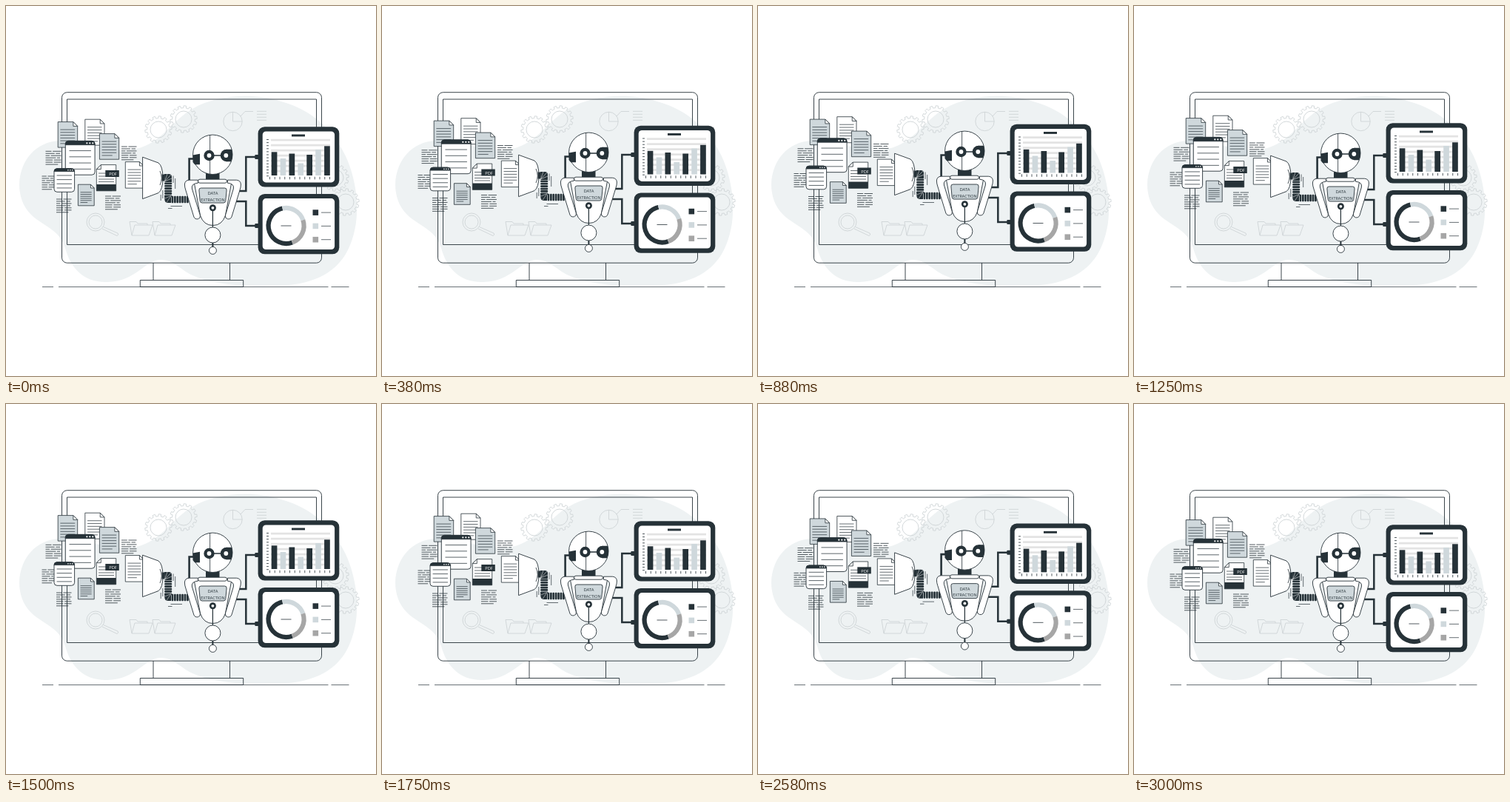
Write an HTML page with a canvas that moves like this. It is 500 by 500 pixels and loops after 3040 ms.

```html
<!DOCTYPE html>
<html lang="en">
<head>
<meta charset="utf-8">
<title>Data extraction</title>
<style>
html, body { margin: 0; width: 100%; height: 100%; overflow: hidden; background: #fff; }
canvas { display: block; width: 500px; height: 500px; }
</style>
</head>
<body>
<canvas id="stage"></canvas>
<script>
const LOOP = 3040, CYCLE = 3000, FPS = 24, LIFT = 6;
const INK = '#263238', PALE = '#cfd8dc', MID = '#a6a6a6', FAINT = '#cfd4d6', BLOB = '#eef2f3';
const canvas = document.getElementById('stage');
const c = canvas.getContext('2d');
const ratio = window.devicePixelRatio || 1;
canvas.width = canvas.height = 500 * ratio;

function paint(fill, stroke, width = 0.9) {
  if (fill) { c.fillStyle = fill; c.fill(); }
  if (stroke) { c.strokeStyle = stroke; c.lineWidth = width; c.stroke(); }
}
function box(x, y, w, h, r, fill, stroke, width) {
  c.beginPath();
  c.roundRect(x, y, w, h, r);
  paint(fill, stroke, width);
}
function disc(x, y, r, fill, stroke, width) {
  c.beginPath();
  c.arc(x, y, r, 0, Math.PI * 2);
  paint(fill, stroke, width);
}
function line(points, stroke = INK, width = 0.9) {
  c.beginPath();
  for (let i = 0; i < points.length; i += 2) c.lineTo(points[i], points[i + 1]);
  paint(null, stroke, width);
}
function shape(d, fill, stroke, width) {
  const p = new Path2D(d);
  if (fill) { c.fillStyle = fill; c.fill(p); }
  if (stroke) { c.strokeStyle = stroke; c.lineWidth = width || 0.9; c.stroke(p); }
}
function shifted(dy, draw) {
  c.save();
  c.translate(0, dy);
  draw();
  c.restore();
}

// Condensed lettering: use whichever installed family sets it narrowest.
const face = (family, size) => `extra-condensed ${size}px "${family}", sans-serif`;
function wide(family, text) {
  c.font = face(family, 100);
  return c.measureText(text).width / 100;
}
const narrow = ['Roboto', 'Noto Sans', 'Open Sans', 'Lato', 'Liberation Sans']
  .sort((a, b) => wide(a, 'EXTRACTION') - wide(b, 'EXTRACTION'))[0];
function word(text, x, y, room, most, fill) {
  c.font = face(narrow, Math.min(most, room / wide(narrow, text)));
  c.textAlign = 'center';
  c.fillStyle = fill;
  c.fillText(text, x, y);
}

function gear(x, y) {
  const teeth = 14, step = Math.PI * 2 / teeth;
  c.beginPath();
  for (let i = 0; i < teeth; i++) {
    const a = i * step;
    c.arc(x, y, 15.3, a, a + step * 0.45);
    c.arc(x, y, 18.2, a + step * 0.52, a + step * 0.93);
  }
  c.closePath();
  paint(null, FAINT, 0.9);
  disc(x, y, 11, null, FAINT, 0.9);
}
function folder(x) {
  shape(`M${x + 3} 310 L${x} 291.5 H${x + 9} L${x + 11} 294 H${x + 24} V296`, null, FAINT);
  shape(`M${x + 3} 310 L${x + 7} 296 H${x + 31} L${x + 26} 310 Z`, null, FAINT);
}

function backdrop() {
  shape('M18 241 C19 209 40 183 73 182 C111 181 135 198 169 194 C208 190 223 155 252 139 ' +
    'C284 120 334 117 372 129 C416 141 443 170 459 203 C476 240 480 288 465 323 ' +
    'C450 361 414 376 374 377.5 C326 380 281 377 252 364 C235 356 228 344 210 343 ' +
    'C188 342 177 372 137 373 C104 374 87 353 80 327 C73 302 49 297 34 282 C23 271 18 257 18 241 Z', BLOB);
  gear(206, 167);
  gear(240, 153);
  gear(445, 232);
  gear(459, 265);
  disc(306.5, 156, 12.7, null, FAINT);
  line([306.5, 143.3, 306.5, 156, 319.2, 156], FAINT);
  line([317, 149, 323, 142.5, 334, 142.5], FAINT);
  for (let i = 0; i < 4; i++) line([339, 142.3 + i * 4, 352, 142.3 + i * 4], FAINT);
  disc(121, 292, 12, null, FAINT);
  disc(121, 292, 9, null, FAINT);
  shape('M131.5 298.5 L151 307 Q153 309.5 150 310.5 L130 301', null, FAINT);
  folder(167);
  folder(198);

  box(75.5, 116.7, 351, 230.5, 7, null, INK);
  box(82.5, 126, 337, 196.5, 0, null, INK);
  line([199, 347, 199, 370.5]);
  line([302.5, 347, 302.5, 370.5]);
  box(181.3, 370.5, 139.4, 9, 0, null, INK);
  for (const [a, b] of [[49, 64], [71, 435.5], [439.5, 463.5]]) line([a, 379.6, b, 379.6], INK, 0.7);
}

function sheet(x, y, w, h, fill, rows) {
  const r = x + w, f = w * 0.22;
  shape(`M${x} ${y} H${r - f} L${r} ${y + f} V${y + h} H${x} Z`, fill, INK, 0.8);
  shape(`M${r - f} ${y} V${y + f} H${r} Z`, '#fff', INK, 0.8);
  const gap = (h - 12) / rows;
  for (let i = 0; i < rows; i++) {
    const ly = y + 10.5 + i * gap;
    line([x + 3.2, ly, r - (i === rows - 1 ? 9 : 3.5), ly], INK, 0.7);
  }
}
function prose(x, y, w) {
  const cuts = [0.42, 0.62, 0.3, 0.7, 0.5];
  cuts.forEach((cut, i) => {
    const ly = y + i * 2.95, m = x + w * cut;
    line([x, ly, m - 0.8, ly], INK, 0.8);
    line([m + 0.8, ly, x + w - (i % 2) * 1.5, ly], INK, 0.8);
  });
  line([x, y + 14.8, x + w * 0.45, y + 14.8], INK, 0.8);
  line([x + w * 0.53, y + 14.8, x + w, y + 14.8], INK, 0.8);
  line([x, y + 17.8, x + w * 0.8, y + 17.8], INK, 0.8);
}
function panel(x, y, w, h, bar, rows) {
  box(x, y, w, h, 4, '#fff', INK);
  box(x, y, w, bar, [4, 4, 0, 0], INK, INK, 0.8);
  for (let i = 0; i < 3; i++) disc(x + w - 2.8 - i * bar * 0.75, y + bar * 0.55, bar * 0.21, '#fff');
  for (let i = 0; i < rows; i++) {
    const ly = y + bar + (h - bar) * (i + 0.95) / (rows + 0.9);
    line([x + w * 0.13, ly, x + w * 0.87, ly], INK, 0.75);
  }
}
function papers() {
  prose(53.5, 196.3, 21);
  prose(48.5, 230, 17);
  prose(156, 190, 20.5);
  prose(134, 257, 21);
  prose(68, 261, 20.5);
  sheet(70.2, 156.6, 26.5, 34.5, PALE, 6);
  sheet(106.8, 153.2, 26.2, 35, '#fff', 6);
  sheet(126.4, 172.6, 26.3, 34.6, PALE, 6);
  panel(80.3, 182.4, 39.8, 45.8, 5.3, 4);
  panel(65, 219.7, 27.6, 31.6, 3.9, 4);
  sheet(97.4, 241.2, 21.8, 28.6, PALE, 6);
  sheet(161.3, 210.6, 24.5, 35.5, '#fff', 6);

  shape('M128.3 214.6 H148.7 V249.8 H122.3 V220.6 Z', '#fff', INK, 0.8);
  shape('M128.3 214.6 V220.6 H122.3 Z', '#fff', INK, 0.8);
  for (const y of [226, 230, 234, 237.5]) line([125, y, 146, y], INK, 0.7);
  box(122.3, 241, 26.4, 8.8, 0, INK);
  box(134.3, 222, 18.5, 9, 0, INK);
  word('PDF', 144.5, 229.3, 10.5, 8, '#fff');
}

function pipe() {
  shape('M184.6 204.2 L206 212 Q211.8 216 212 232.5 Q211.8 248.5 206 252.6 L184.6 260.6 Z', '#fff', INK);
  shape('M208 223 Q212.5 232.5 208 242', null, INK, 0.8);
  box(210.5, 227.5, 4, 9, 0, INK);
  shape('M214 227 H220 Q224 227 224 231 V238 H214.5 Z', INK);
  line([214.5, 237, 218, 227], '#fff', 0.5);
  line([214.5, 237, 222.8, 228.2], '#fff', 0.5);
  line([214.5, 237, 224, 233], '#fff', 0.5);
  for (let y = 238.5; y < 256; y += 3.4) box(214.2, y, 10, 2.7, 1, INK);
  shape('M214.3 256 H223 V266 H219 Q214.3 266 214.3 261 Z', INK);
  line([223, 256.5, 214.8, 260], '#fff', 0.5);
  line([223, 256.5, 217, 265.5], '#fff', 0.5);
  for (let x = 223.6; x < 246; x += 3.4) box(x, 256.8, 2.7, 9.4, 1, INK);
  line([226, 229.5, 226, 239], INK, 0.7);
  line([228.7, 233, 228.7, 247], INK, 0.7);
  line([209.2, 255, 209.2, 263], INK, 0.7);
  line([211.8, 249, 211.8, 260], INK, 0.7);
  line([222.5, 270.5, 238, 270.5], INK, 0.7);
  line([219, 273.5, 224.5, 273.5], INK, 0.7);
}

function robot() {
  line([310, 250, 324.3, 250, 324.3, 204, 341, 204], INK, 2.5);
  line([310, 264, 324.3, 264, 324.3, 297, 341, 297], INK, 2.5);
  box(336.3, 201, 6, 6, 1, INK);
  box(336.3, 294, 6, 6, 1, INK);
  pipe();
  line([255, 206.5, 247.6, 206.5, 247.6, 240], INK, 2.6);

  box(270, 225, 18.5, 12, 0, INK);
  disc(279.3, 200.8, 26.7, '#fff', INK);
  c.save();
  c.beginPath();
  c.arc(279.3, 200.8, 26.7, 0, Math.PI * 2);
  c.clip();
  line([275.6, 174, 275.6, 228], INK, 0.8);
  line([274, 202, 298, 202], INK, 1.6);
  disc(298, 202, 8.3, INK);
  box(298, 193.7, 10, 16.6, 0, INK);
  disc(297.3, 202, 2.9, '#fff');
  c.restore();
  disc(274.5, 202, 7.2, INK);
  disc(274.5, 202, 2.9, '#fff');
  shape('M252.5 201.5 L262 199.8 V214.3 H255 L252.5 211 Z', INK);

  shape('M254 237 H305 L296.5 283 Q292 296.5 279.5 296.5 Q267 296.5 262.5 283 Z', '#fff', INK);
  box(259.5, 234.2, 39, 5, 2.5, '#fff', INK);
  for (const side of [-1, 1]) {
    c.save();
    c.translate(279.4, 0);
    c.scale(side, 1);
    shape('M20 235.2 H32 Q37.5 235.5 38 241 Q38 245 36.5 249 L25.5 285 Q24 288.5 20 287.8 Q16.5 287 17 283 ' +
      'L28 247 Q29.5 240 20 239.2 Z', '#fff', INK);
    c.restore();
  }
  shape('M263.5 246 H295.5 Q298.4 246 298.1 249 L296.8 263.5 Q296.4 266 294 266 H265 Q262.6 266 262.2 263.5 L260.9 249 Q260.6 246 263.5 246 Z', PALE, INK);
  word('DATA', 279.4, 255, 14, 7.8, INK);
  word('EXTRACTION', 279.4, 263.6, 32.5, 7.8, INK);
  line([279.4, 276, 279.4, 300], INK, 1.2);
  disc(279.4, 272.8, 4.5, INK);
  disc(279.4, 272.8, 1.9, '#fff');
  disc(279.4, 309.5, 10.5, '#fff', INK);
  line([279.4, 320, 279.4, 326], INK, 2);
  disc(279.4, 330.4, 5, '#fff', INK);
}

function tablet(y) {
  box(340.6, y, 109.7, 81.4, 9, INK);
  box(346.7, y + 6.2, 97.4, 69, 4.5, '#fff');
}
function tablets() {
  tablet(163.2);
  box(386, 173.5, 18, 2.9, 0, INK);
  for (let y = 179.8; y < 226; y += 7) box(358, y, 80, 2.8, 0, '#e3e3e3');
  const tops = [197.3, 206, 199.5, 212.5, 201, 194, 189.3];
  tops.forEach((top, i) => box(358.7 + i * 11.9, top, 7.7, 229 - top, 0, i % 2 ? PALE : INK));
  for (let i = 0; i < 13; i++) {
    line([352, 180.5 + i * 4.1, 355, 180.5 + i * 4.1], INK, 0.8);
    line([356.5 + i * 6.75, 230.8, 356.5 + i * 6.75, 234.3], INK, 0.8);
  }

  tablet(253.9);
  const rad = Math.PI / 180;
  for (const [a, b, tint] of [[70, 258, INK], [258, 341, PALE], [341, 430, MID]]) {
    c.beginPath();
    c.arc(378.6, 297, 24, a * rad, b * rad);
    paint(null, tint, 6.2);
  }
  line([371.5, 297, 385.5, 297], INK, 0.8);
  [INK, PALE, MID].forEach((tint, i) => {
    const y = 275.3 + i * 18.3;
    box(414.5, y, 7.6, 7.6, 0, tint);
    line([426, y + 3.8, 439, y + 3.8], INK, 0.7);
  });
}

// Steady rise and fall, LIFT pixels each way.
function bob(t, period) {
  return -LIFT * (1 - Math.abs(1 - 2 * (t % period) / period));
}
function render(now) {
  const step = Math.min(Math.floor((now % LOOP) * FPS / 1000 + 0.1), 72);
  const t = step * 1000 / FPS;
  const slow = bob(t, CYCLE), fast = bob(t, CYCLE / 2);
  c.setTransform(ratio, 0, 0, ratio, 0, 0);
  c.fillStyle = '#fff';
  c.fillRect(0, 0, 500, 500);
  backdrop();
  shifted(slow, papers);
  shifted(fast, robot);
  shifted(slow, tablets);
}
let start;
function tick(now) {
  if (start === undefined) start = now;
  render(now - start);
  requestAnimationFrame(tick);
}
render(0);
requestAnimationFrame(tick);
</script>
</body>
</html>
```
